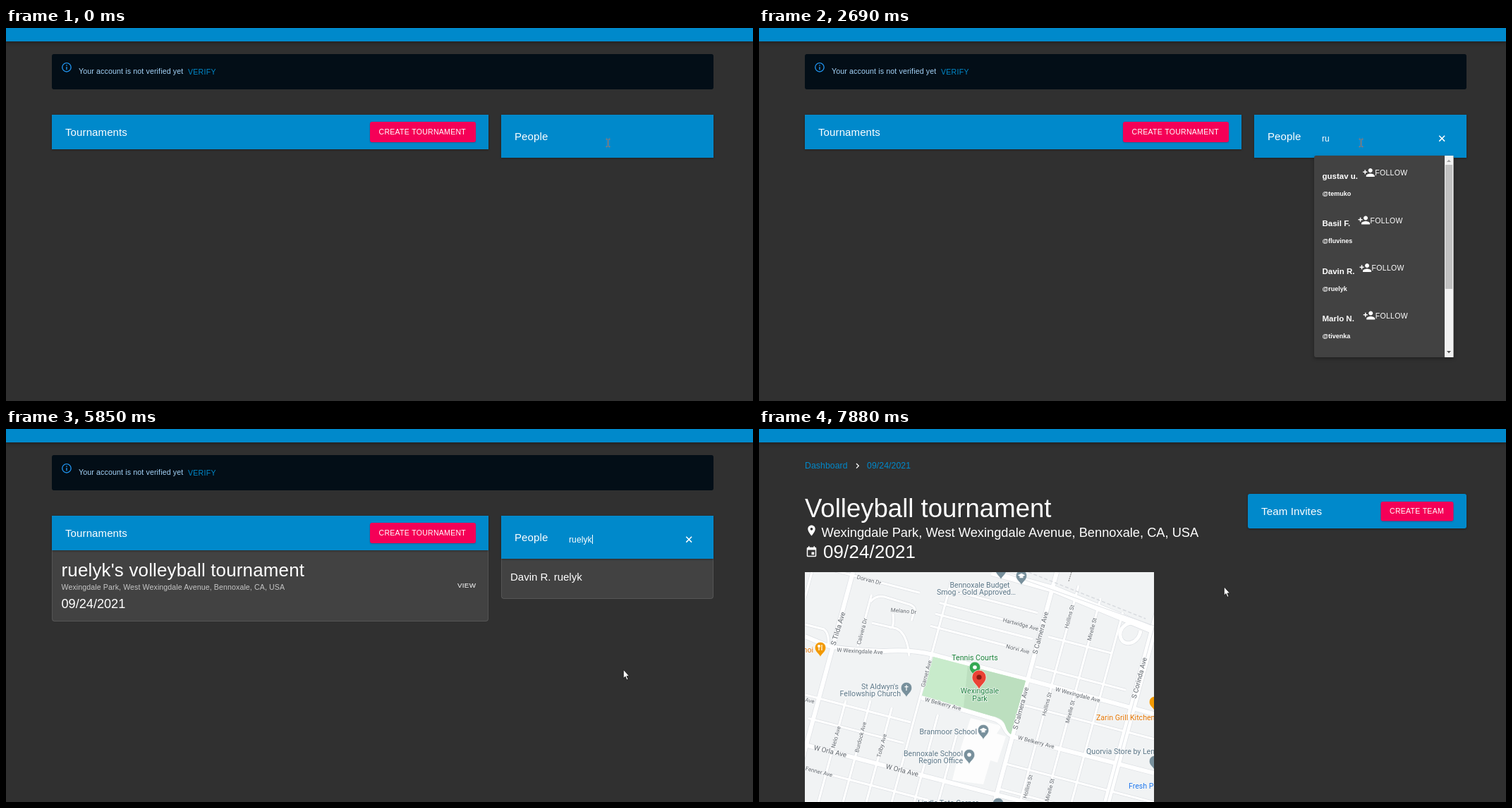
An HTML page that plays this animation: 1059 px wide and 529 px high, repeating every 8 s.

```html
<!DOCTYPE html>
<html lang="en">
<head>
<meta charset="utf-8">
<title>Tournament search</title>
<style>
  html, body { margin: 0; width: 100%; height: 100%; overflow: hidden; background: #303030; }
  svg { display: block; }
  #stage { width: 100vw; height: 100vh; }
  text { font-family: "Liberation Sans", Arial, sans-serif; white-space: pre; }
  .map text { font-family: Roboto, "Open Sans", sans-serif; paint-order: stroke; stroke: #f8f9fa; stroke-width: 1.6px; stroke-linejoin: round; }
  .raised { filter: drop-shadow(0 1px 1px rgba(0,0,0,.22)); }
  .lift { filter: drop-shadow(0 1.5px 1.8px rgba(0,0,0,.34)); }
  .float { filter: drop-shadow(0 2.5px 2.5px rgba(0,0,0,.34)); }
</style>
</head>
<body>
<svg id="stage" viewBox="0 0 1059 529"></svg>
<script>
const LOOP = 8000;
const BLUE = '#0089cb', PINK = '#f50057', CARD = '#424242', WHITE = '#fff';
const ADDRESS = 'Wexingdale Park, West Wexingdale Avenue, Bennoxale, CA, USA';
const USER = 'ruelyk', DATE = '09/24/2021';

const ICON = {
  info: 'M11 9H13V7H11M12 20C7.59 20 4 16.41 4 12S7.59 4 12 4 20 7.59 20 12 16.41 20 12 20M12 2A10 10 0 0 0 2 12 10 10 0 0 0 12 22 10 10 0 0 0 22 12 10 10 0 0 0 12 2M11 17H13V11H11Z',
  addPerson: 'M15 12c2.21 0 4-1.79 4-4s-1.79-4-4-4-4 1.79-4 4 1.79 4 4 4zm-9-2V7H4v3H1v2h3v3h2v-3h3v-2H6zm9 4c-2.67 0-8 1.34-8 4v2h16v-2c0-2.66-5.33-4-8-4z',
  place: 'M12 2C8.13 2 5 5.13 5 9c0 5.25 7 13 7 13s7-7.75 7-13c0-3.87-3.13-7-7-7zm0 9.5c-1.38 0-2.5-1.12-2.5-2.5s1.12-2.5 2.5-2.5 2.5 1.12 2.5 2.5-1.12 2.5-2.5 2.5z',
  event: 'M17 12h-5v5h5v-5zM16 1v2H8V1H6v2H5c-1.1 0-2 .9-2 2v14c0 1.1.9 2 2 2h14c1.1 0 2-.9 2-2V5c0-1.1-.9-2-2-2h-1V1h-2zm3 18H5V8h14v11z'
};

function el(parent, tag, attrs = {}) {
  const node = document.createElementNS('http://www.w3.org/2000/svg', tag);
  for (const k in attrs) node.setAttribute(k, attrs[k]);
  return parent.appendChild(node);
}
const group = (p, cls = '') => el(p, 'g', { class: cls });
const box = (p, x, y, x2, y2, fill, more = {}) =>
  el(p, 'rect', { x, y, width: x2 - x, height: y2 - y, fill, ...more });
const path = (p, d, more) => el(p, 'path', { d, ...more });
function text(p, x, y, str, size, fill = WHITE, more = {}) {
  const node = el(p, 'text', { x, y, 'font-size': size, fill, ...more });
  node.textContent = str;
  return node;
}
const caps = (p, x, y, str, size = 10.5, fill = WHITE) =>
  text(p, x, y, str, size, fill, { 'letter-spacing': size * .02857 });
const title = (p, x, y, str, size = 15) =>
  text(p, x, y, str, size, WHITE, { 'letter-spacing': size * .0075 });
const icon = (p, x, y, name, size = 18, fill = WHITE) =>
  path(p, ICON[name], { fill, transform: `translate(${x} ${y}) scale(${size / 24})` });
function pinkButton(p, x, y, x2, y2, tx, ty, label) {
  box(p, x, y, x2, y2, PINK, { rx: 3, class: 'raised' });
  caps(p, tx, ty, label);
}
const show = (node, on) => node.setAttribute('visibility', on ? 'inherit' : 'hidden');

const stage = document.getElementById('stage');
box(stage, 0, 0, 1059, 529, '#303030');
box(stage, 0, -10, 1059, 19, BLUE, { class: 'float' });

// Dashboard page
const dash = group(stage);
box(dash, 65, 37, 1003, 87, '#030e17', { rx: 3 });
icon(dash, 77.7, 47.5, 'info', 16.5, '#2196f3');
text(dash, 103, 65, 'Your account is not verified yet', 10.65, '#a6d5fa', { 'letter-spacing': .12 });
caps(dash, 258, 65.5, 'VERIFY', 10.5, BLUE);

const results = group(dash);
const outline = 'rgba(255,255,255,.14)';
box(results, 65.5, 165.5, 683.5, 272.5, CARD, { rx: 3, stroke: outline });
title(results, 78.5, 209, USER + "'s volleyball tournament", 25.9);
text(results, 78.5, 227.5, ADDRESS, 10.6, '#c6c6c6', { 'letter-spacing': .11 });
text(results, 78.5, 254, DATE, 18.15);
const hover = box(results, 628, 211, 677, 234, 'rgba(255,255,255,.08)', { rx: 3 });
caps(results, 640, 225, 'VIEW', 9.85);
box(results, 702.5, 175.5, 1002.5, 240.5, CARD, { rx: 3, stroke: outline });
text(results, 715, 214.5, 'Davin R. ' + USER, 15);

box(dash, 65, 123, 684, 172, BLUE, { class: 'lift' });
title(dash, 84, 153, 'Tournaments');
pinkButton(dash, 516, 133, 666, 162, 528.5, 151, 'CREATE TOURNAMENT');
box(dash, 702, 123, 1003, 184, BLUE, { class: 'lift' });
title(dash, 721, 159, 'People');

const typed = text(dash, 798, 160.5, '', 12, WHITE, { 'letter-spacing': .1125 });
const caret = box(dash, 0, 150, 1, 163, WHITE);
const clear = path(dash, 'M964.3 152.8l7.8 7.8m0-7.8l-7.8 7.8', { stroke: WHITE, 'stroke-width': 1.5 });

const idleField = group(dash);
path(idleField, 'M793 135.5H790Q787 135.5 787 138.5V175Q787 178 790 178H981.5Q984.5 178 984.5 175V138.5Q984.5 135.5 981.5 135.5H913',
  { fill: 'none', stroke: 'rgba(255,255,255,.28)' });
text(idleField, 797, 138.5, 'name | @username | email', 9.2, 'rgba(255,255,255,.5)', { 'letter-spacing': .08 });

// Suggestions: name, handle, left edge of the follow icon
const PEOPLE = {
  gustav: ['gustav u.', '@temuko', 855.5],
  basil: ['Basil F.', '@fluvines', 848.8],
  davin: ['Davin R.', '@' + USER, 850.8]
};
function dropdown(rows, bottom, thumbEnd) {
  const g = group(dash);
  box(g, 787, 181, 985, bottom, CARD, { rx: 3, class: 'float' });
  rows.forEach(([name, handle, x], i) => {
    const y = i * 67.5;
    text(g, 798.5, 213.5 + y, name, 11.5, WHITE, { 'font-weight': 700 });
    text(g, 798.5, 237.5 + y, handle, 9, WHITE, { 'font-weight': 700 });
    icon(g, x, 196 + y, 'addPerson');
    caps(g, x + 17.8, 209.3 + y, 'FOLLOW');
  });
  if (thumbEnd) {
    box(g, 972, 181, 984.5, bottom, '#f1f1f1');
    box(g, 973, 194, 983, thumbEnd, '#c1c1c1');
    path(g, 'M975 190l3-3.3 3 3.3z', { fill: '#a3a3a3' });
    path(g, 'M975 458l3 3.3 3-3.3z', { fill: '#505050' });
  }
  return g;
}
const lists = [
  [1740, 2260, dropdown([
    ['Edwyn T.', '@larkow', 855], ['Hobie V.', '@quokabanu', 861.8],
    ['gabe b.', '@pimolo', 845.8], ['haejeong b.', '@vilmo', 870]], 467, 277)],
  [2260, 3930, dropdown([PEOPLE.gustav, PEOPLE.basil, PEOPLE.davin,
    ['Marlo N.', '@tivenka', 856]], 467, 370)],
  [3930, 5730, dropdown([PEOPLE.gustav, PEOPLE.basil, PEOPLE.davin], 396)]
];

// Tournament page
const detail = group(stage);
text(detail, 65, 56.3, 'Dashboard', 12.2, BLUE, { 'letter-spacing': .11 });
path(detail, 'M138 49l3.3 3.3-3.3 3.3', { fill: 'none', stroke: WHITE, 'stroke-width': 1.3 });
text(detail, 153, 56.3, DATE, 12.2, BLUE, { 'letter-spacing': .11 });
text(detail, 65, 125.3, 'Volleyball tournament', 36.55);
icon(detail, 65.5, 135, 'place');
text(detail, 88.5, 153, ADDRESS, 18.28);
icon(detail, 65.5, 165.5, 'event');
title(detail, 91, 183.4, DATE, 25.8);
box(detail, 693, 92, 1003, 141, BLUE, { rx: 3, class: 'lift' });
title(detail, 712, 121.6, 'Team Invites', 15.1);
pinkButton(detail, 881.5, 103, 984.5, 130.5, 894, 120.2, 'CREATE TEAM');

const frame = el(detail, 'svg', { x: 65, y: 203, width: 495, height: 326, viewBox: '65 203 495 326', class: 'map' });
box(frame, 65, 203, 560, 529, '#e5e3df');
const map = group(frame);
drawMap();

function drawMap() {
  const TILT = .27, RISE = .26;
  // A street running down the page, placed by its x at y = 400
  const down = (x, y1, y2) => `M${x - (y1 - 400) * TILT} ${y1}L${x - (y2 - 400) * TILT} ${y2}`;
  // A street running across, placed by its y at x = 300
  const across = (y, x1, x2) => `M${x1} ${y + (x1 - 300) * RISE}L${x2} ${y + (x2 - 300) * RISE}`;

  box(map, 65, 203, 560, 529, '#f1f3f4');
  path(map, 'M300 410L344 421L337 432L350 436L338 473L328 470L318 504L274 498L282 466L290 440Z', { fill: '#fdfdfd' });

  const small = [
    across(251, 100, 228), across(258, 256, 402), across(275, 250, 388), across(294, 243, 384),
    across(236, 268, 395), across(542, 65, 240), across(438, 65, 215), across(470, 70, 205),
    across(372, 372, 560), across(462, 350, 560), across(500, 340, 560),
    across(313, 392, 520), across(266, 410, 500),
    down(115, 235, 308), down(119, 385, 529), down(154, 385, 529), down(187, 395, 529),
    down(255, 405, 529), down(289, 430, 529), down(223, 215, 529),
    down(405, 222, 529), down(441, 240, 529), down(478, 260, 529),
    'M158 245Q166 235 178 238L214 249Q224 253 219 262L216 272M184 280Q192 288 190 262',
    'M213 322Q210 290 195 283L160 275', 'M75 203L65 240M65 277L92 284Q100 290 98 308'
  ];
  const main = [
    'M65 294L96 307Q110 312 176 315Q215 312 247 320L379 355L560 404',
    'M230 381L329 410Q343 413 348 424T366 438L560 488',
    across(509, 65, 400), down(80, 203, 529), down(369, 203, 529)
  ];
  const wide = [down(528, 203, 529), 'M330 203L420 228L560 286'];
  const ramp = ['M545 278C520 268 508 285 513 297S538 305 541 286'];
  const roads = [[small, 3.2], [main, 6], [ramp, 5], [wide, 10]];
  for (const [stroke, extra] of [['#dde0e4', 1.4], [WHITE, 0]])
    for (const [list, w] of roads)
      for (const d of list) path(map, d, { fill: 'none', stroke, 'stroke-width': w + extra });
  path(map, down(528, 203, 529) + 'M345 203L560 279', { fill: 'none', stroke: '#dfe2e6' });
  path(map, 'M382 203L548 269', { fill: 'none', stroke: '#d8dbdf', 'stroke-width': 1.5, 'stroke-dasharray': '5 3' });
  path(map, 'M439 216l4-13', { stroke: '#777', 'stroke-dasharray': '2 1' });

  // The park lies over the inner edges of its streets
  path(map, 'M247 323L378 357L357 433Q352 430 349 420T330 407L231 378Z', { fill: '#c8ebcb' });
  path(map, 'M296 336L378 357L357 433Q352 430 349 420T330 407L290 395Z', { fill: '#bcdfbf' });

  const street = (x, y, angle, size, str) => text(map, x, y, str, size, '#62686e',
    { transform: `rotate(${angle} ${x} ${y})`, 'text-anchor': 'middle', dy: size * .35 });
  const crossNames = [
    [156, 214, 'Dorvan Dr'], [371, 277, 'Hartwidge Ave'], [367, 312, 'Norvi Ave'],
    [452, 377, 'W Wexingdale Ave'], [261, 390, 'W Belkerry Ave'], [393, 444, 'W Belkerry Ave'],
    [85, 486, 'Fenner Ave'], [68, 384, 'lo Ave']
  ];
  const downNames = [
    [146, 287, 'Calivera Dr'], [237, 347, 'Garnet Ave'], [440, 266, 'Hollins St'], [408, 390, 'Hollins St'],
    [381, 507, 'Hollins St'], [472, 284, 'Mirelle St'], [441, 401, 'Mirelle St'], [412, 512, 'Mirelle St'],
    [109, 437, 'Nelo Ave'], [144, 437, 'Burdock Ave'], [174, 449, 'Tolby Ave']
  ];
  crossNames.forEach(([x, y, s]) => street(x, y, 14.5, 8, s));
  downNames.forEach(([x, y, s]) => street(x, y, -75, 8, s));
  street(143, 315, 3, 8, 'W Wexingdale Ave');
  street(205, 258, 5, 8, 'Melano Dr');
  street(112, 283, -73, 10, 'S Tilda Ave');
  street(399, 289, -75, 9.6, 'S Calmera Ave');
  street(371, 396, -75, 9.6, 'S Calmera Ave');
  street(539, 353, -75, 9.7, 'S Corinda Ave');
  street(101, 457, 13, 9.8, 'W Orla Ave');
  street(203, 484, 14, 9.8, 'W Orla Ave');

  const slate = '#5b7686', orange = '#e37400', green = '#188038';
  const poi = (x, y, str, fill = slate, anchor = 'start') =>
    text(map, x, y, str, 10.6, fill, { 'text-anchor': anchor });
  poi(313, 225, 'Bennoxale Budget', slate, 'middle');
  poi(308, 235, 'Smog - Gold Approved…', slate, 'middle');
  poi(198, 369, "St Aldwyn's", slate, 'end');
  poi(201, 379, 'Fellowship Church', slate, 'end');
  poi(309, 433, 'Branmoor School', slate, 'end');
  poi(289, 464, 'Bennoxale School', slate, 'end');
  poi(289, 474, 'Region Office', slate, 'end');
  poi(225, 534, 'Lindle Tots Corner');
  poi(464, 461, 'Quorvia Store by Len');
  poi(478, 413, 'Zarin Grill Kitchen', orange);
  poi(77, 317, 'noi', orange, 'end');
  poi(524, 510, 'Fresh Pantry', '#1a73e8');
  poi(306, 327.5, 'Tennis Courts', green, 'middle');
  poi(313, 375, 'Wexingdale', green, 'middle');
  poi(313, 386, 'Park', green, 'middle');

  const pin = (x, y, r, fill) => path(map,
    `M${x} ${y + r * 1.75}C${x - r * .2} ${y + r * 1.1} ${x - r} ${y + r * .8} ${x - r} ${y}A${r} ${r} 0 0 1 ${x + r} ${y}C${x + r} ${y + r * .8} ${x + r * .2} ${y + r * 1.1} ${x} ${y + r * 1.75}Z`,
    { fill, stroke: WHITE, 'stroke-width': .6 });
  const glyph = (d, x, y) => path(map, d, { transform: `translate(${x} ${y})`, fill: WHITE, stroke: WHITE, 'stroke-width': 1.2 });
  const dot = (x, y, r, fill = WHITE) => el(map, 'circle', { cx: x, cy: y, r, fill });
  const cap = 'M0-2.6L4-.6 0 1.4-4-.6ZM-2 1.4V2.6H2V1.4', cross = 'M0-4V4M-2.6-1.4H2.6', fork = 'M-2-4V4M2-4V4M-3.2-3.6V-1H-.8V-3.6';
  const grey = '#78909c', amber = '#f29900';
  [[343, 200], [372, 208], [209, 367], [318, 427], [298, 462], [561, 471], [339, 531]]
    .forEach(([x, y]) => pin(x, y, 7.8, grey));
  glyph(cap, 372, 208); glyph(cap, 318, 427); glyph(cross, 209, 367);
  dot(298, 462, 2.8);
  pin(87, 310, 7.8, amber); glyph(fork, 87, 310);
  pin(561, 387, 7.8, amber);
  pin(306, 338, 7.8, '#34a853'); dot(306, 338, 2.8);
  pin(312, 352, 10, '#ea4335'); dot(312, 352, 3.6, '#8c1a12');
}

// Pointers, each drawn around its hot spot
const pointers = { beam: group(stage), arrow: group(stage), hand: group(stage) };
path(pointers.beam, 'M-3-5.5H-1L0-4.5 1-5.5H3M0-4.5V4.5M-3 5.5H-1L0 4.5 1 5.5H3', { fill: 'none', stroke: '#cc7352' });
path(pointers.arrow, 'M.3 .3V12.6L3 10 5 14.8 7 14 5 9.4H8.6Z', { fill: WHITE, stroke: '#111', 'stroke-width': .8 });
path(pointers.hand, 'M-1.4 9.6V1.4Q0-.6 1.4 1.4V6Q3 5.3 3.7 6.7 5.2 6 5.9 7.4 7.5 7 7.5 8.8V12Q7.3 14.5 6 17.5H-.3Q-1.5 14.6-4 11 -4 8.4-1.4 9.6Z',
  { fill: WHITE, stroke: '#111', 'stroke-width': .9 });
path(pointers.hand, 'M1.4 6V9M3.7 6.7V9.2M5.9 7.4V9.4', { stroke: '#111', 'stroke-width': .7 });

const POINTER = [
  [0, 'beam', 853.5, 163], [4730, 'beam', 851.5, 163], [4880, 'hand', 813, 192], [5030, 'hand', 852, 342],
  [5180, 'hand', 871, 346], [5330, 'hand', 875, 341], [5730, 'arrow', 875, 341],
  [6500, 'arrow', 848, 333], [6620, 'arrow', 798, 320], [6770, 'arrow', 681, 236],
  [6920, 'hand', 663, 226], [7070, 'hand', 658, 225], [7190, 'hand', 660, 223], [7610, 'arrow', 659, 223.5]
];
// Time, letters typed, caret x
const TYPING = [[0, 0, 798], [1740, 1, 802], [2140, 2, 809], [3930, 3, 815], [5730, 6, 831]];
const BLINK = [590, 1030, 1590, 2690, 3250, 3680, 3930, 4450, 4880, 5330, 5730, 6380, 6770, 7340];

const at = (table, t) => table.filter(row => row[0] <= t).pop();

function draw(t) {
  const onDash = t < 7610, blurred = t >= 7490;
  show(dash, onDash);
  show(detail, !onDash);
  show(frame, t >= 7760);
  show(map, t >= 7880);
  show(results, t >= 5850 && onDash);
  show(hover, blurred && onDash);
  show(idleField, blurred && onDash);
  show(clear, t >= 1740 && !blurred);
  for (const [from, to, list] of lists) show(list, t >= from && t < to);

  const [, count, x] = at(TYPING, t);
  typed.textContent = USER.slice(0, count);
  caret.setAttribute('x', x);
  show(caret, BLINK.filter(b => b <= t).length % 2 === 1);

  const [, kind, px, py] = at(POINTER, t);
  for (const name in pointers) show(pointers[name], name === kind);
  pointers[kind].setAttribute('transform', `translate(${px} ${py})`);
}

const start = performance.now();
function tick() {
  draw((performance.now() - start) % LOOP);
  requestAnimationFrame(tick);
}
tick();
</script>
</body>
</html>
```
